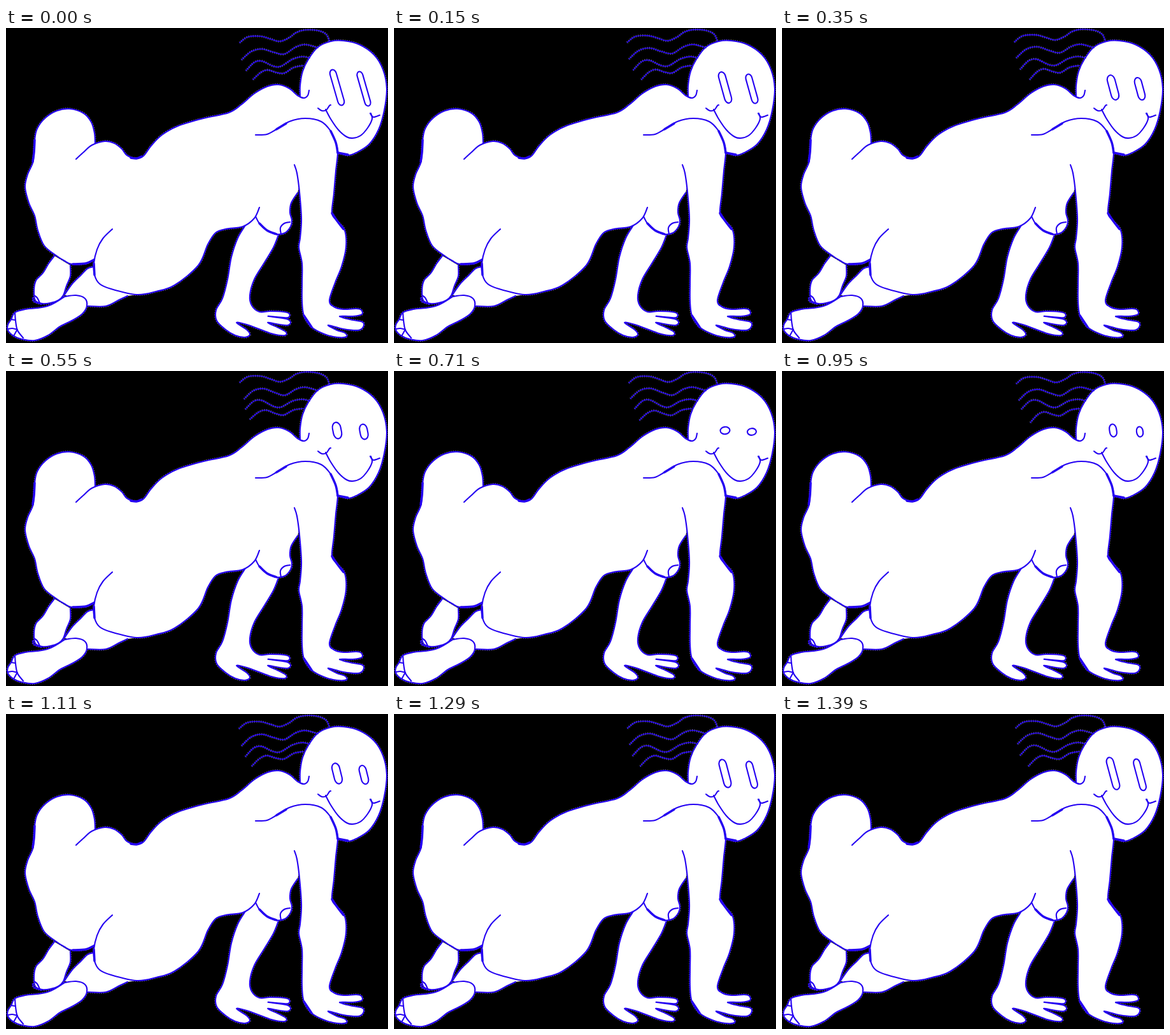
An HTML page for the animation above (1.49 s loop, 600 by 495 pixels).

```html
<!DOCTYPE html>
<html lang="en">
<head>
<meta charset="utf-8">
<title>Blinking figure</title>
<style>
html, body { margin: 0; width: 100%; height: 100%; overflow: hidden; background: #000; }
svg { display: block; width: 100vw; height: 100vh; }
path { stroke-linecap: round; stroke-linejoin: round; }
.fill { fill: #fff; }
.fringe { fill: none; stroke: #fff; stroke-width: 3.4; stroke-dasharray: 1 2.4; stroke-linecap: butt; opacity: .6; }
.line { fill: none; stroke: #2400f2; stroke-width: 2.1; }
.bold { stroke-width: 3.5; }
.thin { stroke-width: 1.6; }
</style>
</head>
<body>
<svg viewBox="0 0 600 495" preserveAspectRatio="none">
  <g id="fills"></g>
  <g id="fringes"></g>
  <g id="lines"></g>
  <g id="eyes"></g>
</svg>
<script>
const parse = s => s.split(' ').map(p => p.split(',').map(Number));

// Smooth curve through a list of points
function curve(pts, start = 'M') {
  let d = start + pts[0];
  for (let i = 0; i < pts.length - 1; i++) {
    const a = pts[i - 1] || pts[i], b = pts[i], c = pts[i + 1], e = pts[i + 2] || c;
    const h1 = [0, 1].map(k => (b[k] + (c[k] - a[k]) / 6).toFixed(2));
    const h2 = [0, 1].map(k => (c[k] - (e[k] - b[k]) / 6).toFixed(2));
    d += `C${h1} ${h2} ${c}`;
  }
  return d;
}

function add(parent, tag, cls) {
  const el = document.createElementNS('http://www.w3.org/2000/svg', tag);
  el.setAttribute('class', cls);
  document.getElementById(parent).append(el);
  return el;
}

const fill = d => add('fills', 'path', 'fill').setAttribute('d', d + 'Z');

function stroke(cls = '') {
  const els = [add('fringes', 'path', 'fringe'), add('lines', 'path', 'line ' + cls)];
  return d => els.forEach(el => el.setAttribute('d', d));
}

const rump = parse('140,181 139,165 134,148 122,134 100,127 80,130 62,141 49,158 45,176 44,195 42,212 34,230 30,250 36,275 45,295 50,318 60,342 78,357 92,366 103,371 125,370 139,363');
const back = parse('110,206 122,195 135,184 155,178 170,181 182,190 190,200 205,205 216,201 228,185 245,168 270,154 310,142 350,133 370,120 390,103 410,92 428,89 445,95 458,106 468,110 474,106 476,98');
const belly = parse('167,316 152,331 143,348 138,370 139,388 147,402 165,410 205,419 236,414 265,404 302,373 317,340 329,322 345,316 372,312 390,299 398,282');
const breast = parse('392,296 398,307 410,318 425,324 438,322 447,312 449,302 446,290 448,275 458,259');
const head = parse('462,107 462,90 466,68 475,49 490,30 510,21 530,20 555,26 578,42 592,65 598,95 594,130 585,160 570,183 550,196 537,200 521,196');
const arm = parse('392,168 410,167 425,159 445,147 470,142 495,147 510,162 518,180 521,196 518,225 515,260 512,291 520,303 532,318 534,345 527,375 517,400 508,428 515,438 530,442 550,441 558,443 559,450 545,453 524,453 540,458 560,462 561,470 553,475 530,473 506,467 520,475 532,479 535,485 520,486 500,481 480,470 468,452 465,430 465,400 465,370 460,345 462,330 464,300 461,258 457,228 453,215');
const farArm = parse('376,310 364,330 354,360 348,395 340,425 330,443 331,460 345,474 360,483 375,486 383,482 378,474 362,463 378,466 400,474 420,481 438,483 440,478 430,472 411,463 430,466 443,467 447,462 440,457 412,453 425,454 443,455 445,449 436,446 415,445 398,446 386,436 383,420 390,395 405,370 420,345 428,325');
const farFoot = parse('76,358 67,370 58,385 47,397 44,412 46,428 57,433 70,432 82,428 90,420 95,405 101,390 101,373');
const shin = parse('138,375 128,378 118,388 104,402 92,419');
const calf = parse('129,437 157,437 178,427 191,421');
const foot = parse('92,422 110,420 124,425 127,437 120,449 105,459 85,469 66,483 45,491 25,489 12,484 3,475 3,466 8,458 14,447 30,442 50,440 65,437 78,431 92,422');

fill(curve(farArm) + 'L398,290');
fill(curve(farFoot));
fill(curve(shin) + curve(calf, 'L') + 'L205,419L147,402');
fill(curve(rump) + curve(belly.slice(3, -1), 'L') + curve(breast, 'L') +
  'L465,228L521,196L500,110' + curve(back.slice(2).reverse(), 'L'));
fill(curve(arm.slice(4)) + 'L440,180');
fill(curve(head));
fill(curve(foot));

[rump, back, belly, breast, head, arm, farArm, farFoot, shin, calf, foot]
  .forEach(p => stroke()(curve(p)));

// Creases, toes and smile
[
  '432,324 431,314 437,307 446,305',
  '14,447 15,460 18,475 27,487',
  '3,473 10,472 18,474',
  '8,458 15,459',
  '17,475 12,484',
  '44,420 49,424 53,432',
  '42,424 44,430 56,434',
  '502,128 510,143 522,160 535,171 545,173 557,169 568,157 575,143 573,134',
  '490,126 496,130 503,129 508,122 510,121',
  '572,134 577,140 587,137'
].forEach(s => stroke()(curve(parse(s))));

// Heavier parts of the pen line
[
  '105,371 125,370 137,365',
  '138,370 139,388',
  '425,159 440,150',
  '510,162 518,180 521,196',
  '521,196 537,199',
  '398,307 410,318 425,324',
  '45,176 44,195 42,210',
  '196,204 205,205 213,202',
  '512,291 520,303 530,316',
  '480,470 468,452'
].forEach(s => stroke('bold')(curve(parse(s))));

const hair = [
  '367,23 380,14 400,13 415,17 430,21 445,15 456,7 470,3 490,4 503,10 508,21',
  '370,50 385,37 402,33 420,38 437,41 455,30 470,26 490,31',
  '377,67 390,54 402,52 420,60 432,60 450,49 465,45 477,47',
  '388,81 400,70 411,66 425,70 437,71 452,62 467,59'
].map(s => ({ pts: parse(s), draw: stroke('thin') }));

const eyes = [[520, 93.5], [562, 95.5]].map(([x, y]) => ({ x, y, el: add('eyes', 'rect', 'line') }));

// time, left height, right height, width, tilt, lift, four hair tips
const keys = [
  [0, 60, 58, 10, -16, 0, 367, 23, 370, 50, 377, 67, 388, 81],
  [350, 42, 38, 12, -15, 3, 365, 22, 368, 47, 374, 65, 389, 81],
  [550, 28, 26, 13, -11, 3, 367, 18, 374, 44, 376, 60, 383, 76],
  [790, 6, 6, 16, -3, 3, 370, 19, 370, 43, 379, 59, 387, 78],
  [950, 22, 18, 11, -9, 3, 368, 20, 372, 46, 376, 60, 390, 81],
  [1110, 35, 32, 12, -14, 2, 366, 23, 370, 50, 376, 67, 386, 82],
  [1390, 54, 53, 11, -15, 2, 367, 22, 370, 47, 374, 65, 387, 82]
];
const steps = [0, 150, 250, 350, 450, 550, 630, 710, 790, 870, 950, 1030, 1110, 1190, 1290, 1390];
const LOOP = 1490;

function pose(t) {
  const i = keys.findLastIndex(k => k[0] <= t);
  const a = keys[i], b = keys[i + 1] || a;
  const f = b === a ? 0 : (t - a[0]) / (b[0] - a[0]);
  return a.map((v, n) => v + (b[n] - v) * f);
}

function render(now) {
  const t = now % LOOP;
  const [, hl, hr, w, tilt, lift, ...tips] = pose(steps.findLast(s => s <= t));

  eyes.forEach(({ x, y, el }, i) => {
    const h = (i ? hr : hl) - 2, ew = w - (i ? 1 : 0);
    const set = (k, v) => el.setAttribute(k, v);
    set('x', x - ew / 2);
    set('y', y - h / 2);
    set('width', ew);
    set('height', h);
    set('rx', ew / 2);
    set('ry', Math.min(h / 2, ew * .7));
    set('transform', `rotate(${tilt} ${x} ${y})`);
    el.style.fill = h < 6 ? '#2400f2' : '#fff';
  });

  hair.forEach(({ pts, draw }, i) => {
    const dx = tips[2 * i] - pts[0][0], dy = tips[2 * i + 1] - pts[0][1];
    const last = pts.length - 1;
    draw(curve(pts.map(([x, y], n) => {
      const u = n / last, k = (1 - u) ** 1.5;
      return [x + dx * k, y + dy * k - lift * Math.sin(Math.PI * u) * (1 - u)];
    })));
  });
}

const begin = performance.now();
function tick() {
  render(performance.now() - begin);
  requestAnimationFrame(tick);
}
tick();
</script>
</body>
</html>
```
